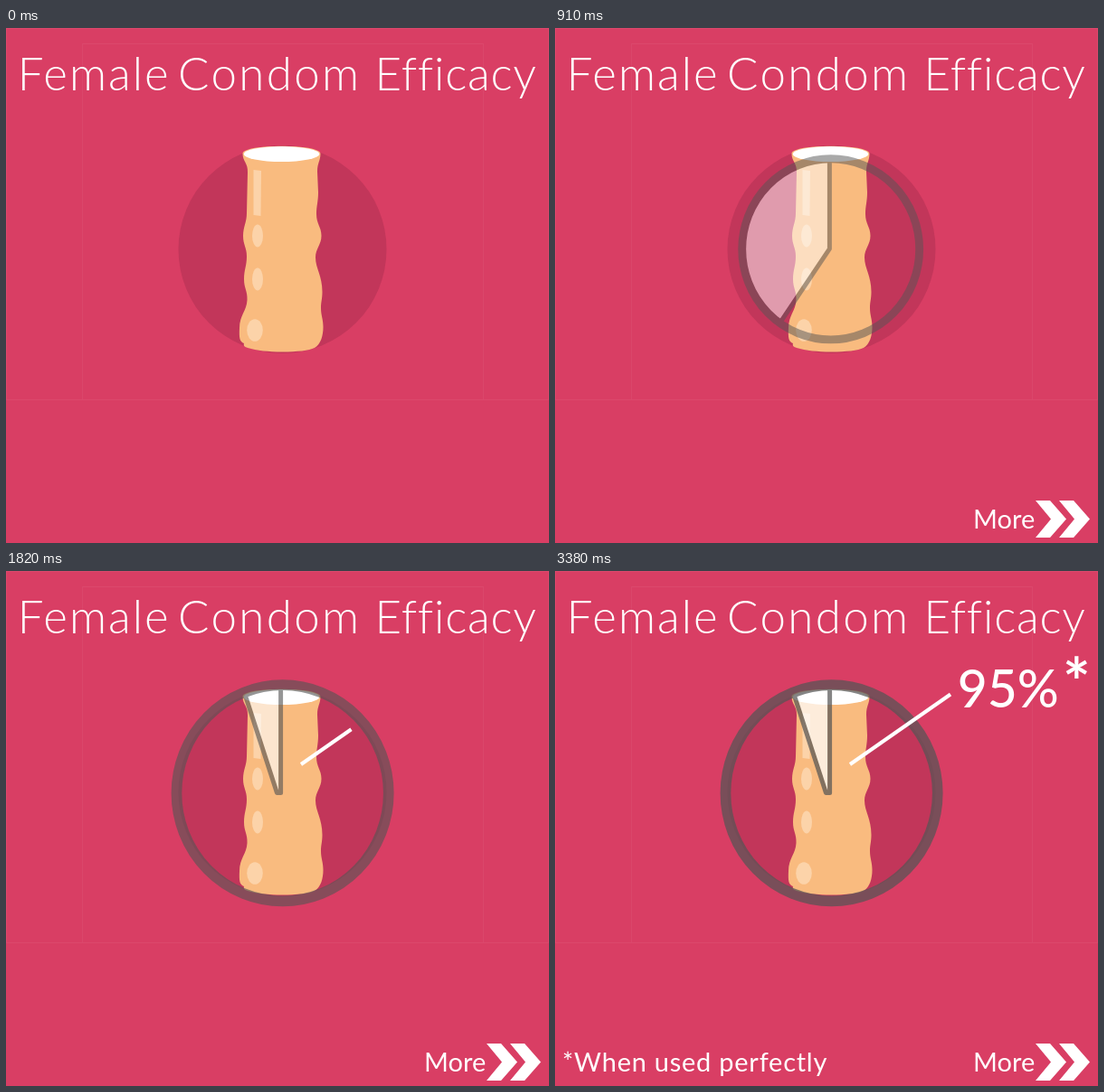
An HTML page with a canvas that plays this animation: 600x570 px, repeating every 6.89 s.

```html
<!DOCTYPE html>
<html lang="en">
<head>
<meta charset="utf-8">
<title>Female Condom Efficacy</title>
<style>
html, body { margin: 0; width: 100%; height: 100%; overflow: hidden; background: #d93e64; }
canvas { display: block; }
</style>
</head>
<body>
<canvas id="stage" width="600" height="570"></canvas>
<script>
const LOOP = 6890, STEP = 130, LAST = 26;
const stage = document.getElementById('stage');
const ctx = stage.getContext('2d');
const layer = document.createElement('canvas');
layer.width = 600;
layer.height = 570;
const pie = layer.getContext('2d');

const clamp = (v, lo = 0, hi = 1) => Math.min(hi, Math.max(lo, v));

function ellipse(c, x, y, rx, ry, color) {
  c.beginPath();
  c.ellipse(x, y, rx, ry, 0, 0, Math.PI * 2);
  c.fillStyle = color;
  c.fill();
}

function text(str, x, y, size, weight = 400, spacing = 0) {
  ctx.font = `${weight} ${size}px Lato, "Open Sans", sans-serif`;
  ctx.letterSpacing = spacing + 'px';
  ctx.fillStyle = '#fff';
  ctx.fillText(str, x, y);
}

function drawBackground() {
  ctx.fillStyle = '#d93e64';
  ctx.fillRect(0, 0, 600, 570);
  ctx.strokeStyle = 'rgba(255,255,255,0.05)';
  ctx.lineWidth = 1;
  ctx.strokeRect(0.5, 0.5, 599, 411);
  ctx.stroke(new Path2D('M84.5 411 V17.5 H527.5 V411'));
  ellipse(ctx, 305.5, 245, 115, 115, '#c2365a');
  text('Female', 12.7, 69, 51, 300, 2);
  text('Condom', 190, 69, 51, 300, 2.4);
  text('Efficacy', 407.5, 69, 51, 300, 0.8);
}

function drawTube() {
  const body = new Path2D(`M261.5 139 C261.5 148 267.5 149 267 160 L266 205
    C266 215 262 220 262 230 C262 240 266 243 266 253 C266 263 263 268 263 278
    C263 288 267 291 266.5 301 C266 313 258 318 258 332 C257.5 343 258 347 263 349
    C262 352 264 353 267 354 C277 357 290 358.5 305 358.5 C322 358.5 335 357 341 354
    C348 350 350.5 340 350.5 331 C350.5 322 348 318 348 310 C348 303 349.5 300 349.5 292
    C349.5 274 342 266 342 254 C342 244 348.5 240 348.5 230 C348.5 220 343 217 343 206
    C343 197 345 192 345 182 L344 159 C344 149 347.5 147 347.5 139
    C347.5 128 261.5 128 261.5 139Z`);
  ctx.fillStyle = '#f9bb7f';
  ctx.fill(body);
  ellipse(ctx, 304.5, 139.6, 41.8, 8.5, '#fff');
  const shine = '#fcd3a9';
  ctx.fillStyle = shine;
  ctx.fill(new Path2D('M273.5 157 L282 158 L281.5 208 L273.5 207Z'));
  ellipse(ctx, 278, 230, 6, 12.5, shine);
  ellipse(ctx, 278, 278, 6, 12.5, shine);
  ellipse(ctx, 275, 334.5, 8.8, 12.3, shine);
}

function drawPie(k) {
  if (k < 3) return;
  const grow = Math.min(k, 8) - 4;
  const r = 31 + 26.2 * grow - 0.8 * grow * grow;
  const ring = clamp(6 + 0.95 * (Math.min(k, 10) - 4), 3, r);
  const rx = r - ring / 2, ry = r * 1.02 - ring / 2;
  const cx = 302 + 0.9 * grow, cy = 241.8 + grow;
  const ax = 302.8 + 0.2 * grow, ay = 241 + 1.1 * grow;
  const hx = ax - 4.2 * clamp((k - 8) / 2);
  const angle = 342 * clamp((k - 2) / 8) * Math.PI / 180;
  const a0 = angle - Math.PI / 2;
  const far = r * 2;

  pie.clearRect(0, 0, 600, 570);
  pie.save();
  pie.beginPath();
  pie.ellipse(cx, cy, rx, ry, 0, 0, Math.PI * 2);
  pie.clip();
  // remaining share, then its two hands
  pie.beginPath();
  pie.moveTo(ax, ay);
  pie.lineTo(hx, ay);
  pie.arc(hx, ay, far, a0, Math.PI * 1.5);
  pie.lineTo(ax, ay - far);
  pie.closePath();
  pie.fillStyle = '#fff';
  pie.fill();
  pie.beginPath();
  pie.moveTo(ax, ay - far);
  pie.lineTo(ax, ay);
  pie.lineTo(hx, ay);
  pie.lineTo(hx + Math.cos(a0) * far, ay + Math.sin(a0) * far);
  pie.strokeStyle = '#555';
  pie.lineWidth = Math.min(5, ring);
  pie.lineJoin = 'round';
  pie.stroke();
  pie.restore();

  pie.beginPath();
  pie.ellipse(cx, cy, rx, ry, 0, 0, Math.PI * 2);
  pie.lineWidth = ring;
  pie.strokeStyle = '#555';
  pie.stroke();

  ctx.globalAlpha = 0.5 + 0.02 * clamp(k - 8, 0, 11);
  ctx.drawImage(layer, 0, 0);
  ctx.globalAlpha = 1;
}

function chevron(x) {
  ctx.beginPath();
  ctx.moveTo(x, -20.5);
  ctx.lineTo(x + 16, -20.5);
  ctx.lineTo(x + 34, 0);
  ctx.lineTo(x + 16, 20.5);
  ctx.lineTo(x, 20.5);
  ctx.lineTo(x + 17, 0);
  ctx.fillStyle = '#fff';
  ctx.fill();
}

function drawMore(k) {
  if (k < 1) return;
  const word = Math.min(1, k * 0.2425);
  ctx.save();
  ctx.translate(462, 544);
  ctx.scale(word, word);
  text('More', 0, 10, 29);
  ctx.restore();
  // the arrow overshoots once, then settles
  const s = k < 6 ? k * 0.237 : 1;
  ctx.save();
  ctx.translate(561, 543.5);
  ctx.scale(s, s);
  chevron(-30);
  chevron(-4);
  ctx.restore();
}

function drawCallout(k) {
  const len = clamp((k - 12) / 4);
  if (len > 0) {
    ctx.beginPath();
    ctx.moveTo(326, 214);
    ctx.lineTo(326 + 111 * len, 214 - 77.5 * len);
    ctx.strokeStyle = '#fff';
    ctx.lineWidth = 4;
    ctx.stroke();
  }
  const size = clamp((k - 16) / 2);
  if (size > 0) text('95%', 444.7, 150.5, 57 * size, 500);
  if (k >= 22) text('*', 561, 150, 72, 700);
  if (k >= 26) text('*When used perfectly', 8, 554, 29, 400, 0.75);
}

function draw() {
  const k = Math.min(LAST, Math.floor(performance.now() % LOOP / STEP));
  drawBackground();
  drawTube();
  drawPie(k);
  drawMore(k);
  drawCallout(k);
  requestAnimationFrame(draw);
}
draw();
</script>
</body>
</html>
```
